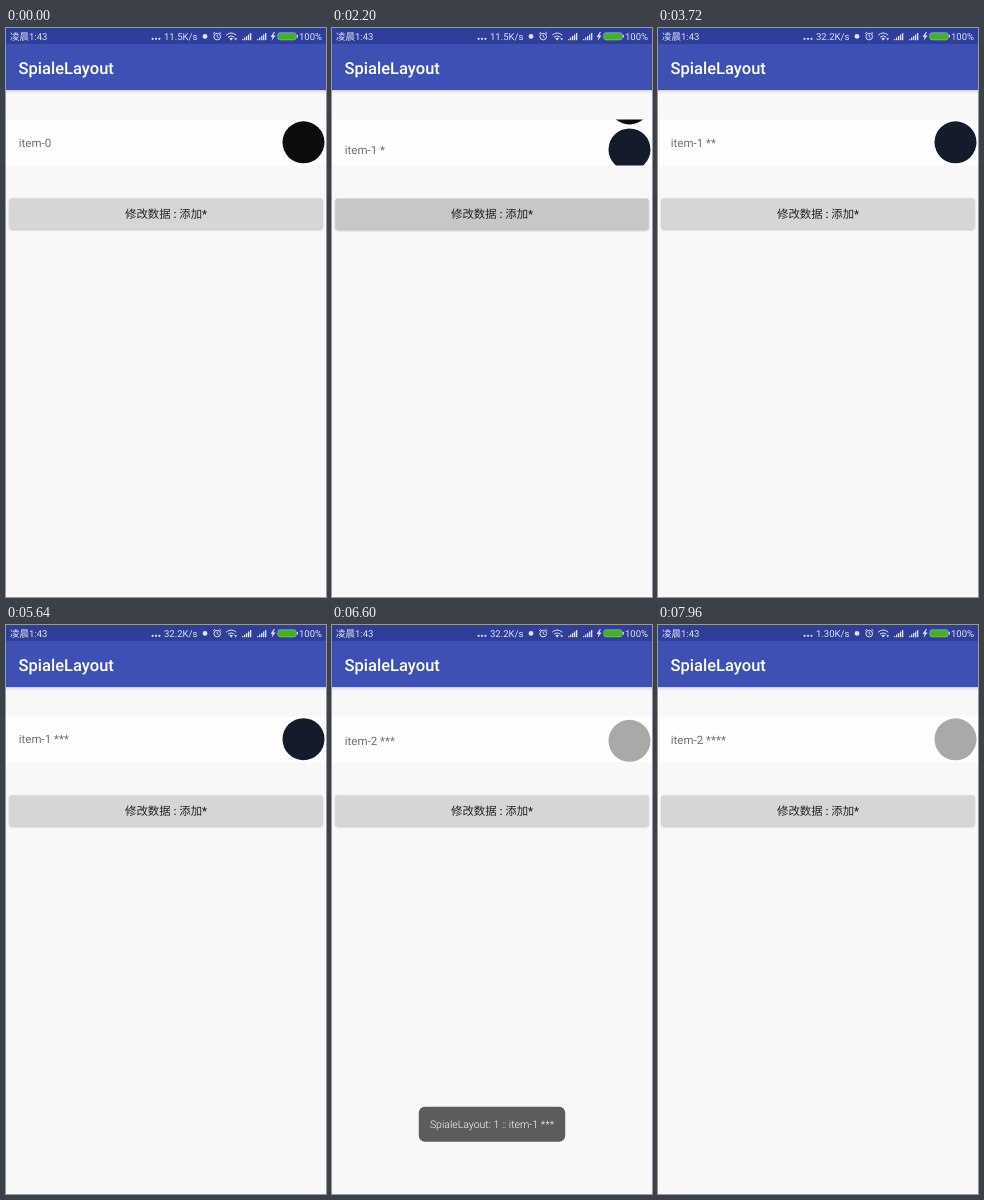
Write an HTML page that moves like this. It is 320 px wide and 569 px high and loops after 8 s.

```html
<!DOCTYPE html>
<html lang="zh-CN">
<head>
<meta charset="utf-8">
<title>SpialeLayout</title>
<style>
  html, body { margin: 0; width: 100%; height: 100%; overflow: hidden; background: #f8f8f8; }
  svg { display: block; width: 100%; height: 100%; }
  text { font-family: Roboto, "Noto Sans CJK SC", "Noto Sans CJK", sans-serif; white-space: pre; text-rendering: geometricPrecision; }
  .status { font-size: 9.5px; fill: #dfe2f1; }
  .title { font-size: 16.5px; font-weight: 500; fill: #fff; }
  .item { font-size: 11.5px; fill: #6f6f6f; }
  .label { font-size: 11.4px; font-weight: 500; fill: #222; }
  .toast { font-size: 10.5px; font-weight: 300; fill: #fff; }
</style>
</head>
<body>
<svg viewBox="0 0 320 569">
  <defs>
    <linearGradient id="barShadow" x2="0" y2="1">
      <stop offset="0" stop-opacity=".18"/>
      <stop offset=".35" stop-opacity=".07"/>
      <stop offset="1" stop-opacity="0"/>
    </linearGradient>
    <filter id="blur" x="-5%" y="-30%" width="110%" height="160%"><feGaussianBlur stdDeviation=".8"/></filter>
    <clipPath id="bannerClip"><rect y="91.5" width="320" height="46"/></clipPath>
    <clipPath id="buttonClip"><rect x="3.3" y="170.5" width="313.4" height="30.6" rx="1.7"/></clipPath>
  </defs>

  <rect id="page" width="320" height="569"/>

  <rect width="320" height="16" fill="#2f3e9a"/>
  <rect y="16" width="320" height="46" fill="#3e50b4"/>
  <rect y="62" width="320" height="4" fill="url(#barShadow)"/>
  <text class="title" x="12.6" y="45.8">SpialeLayout</text>

  <g id="icons" fill="#dfe2f1">
    <text class="status" x="4" y="12.3">凌晨1:43</text>
    <circle cx="146.6" cy="10.8" r="1.1"/><circle cx="150" cy="10.8" r="1.1"/><circle cx="153.4" cy="10.8" r="1.1"/>
    <text class="status" id="speed" x="191.3" y="12.1" text-anchor="end"></text>
    <circle cx="199" cy="8.4" r="2.4"/>
    <g fill="none" stroke="#dfe2f1" stroke-width="1">
      <circle cx="211.2" cy="8.6" r="3.3"/>
      <path d="M211.2 6.7v2.1l1.4.9M207.2 5.7l1.7-1.5M215.2 5.7l-1.7-1.5"/>
      <path d="M220.2 7.2q5-4.4 10 0M222 9.2q3.2-2.7 6.4 0"/>
    </g>
    <path d="M223.4 10.4q1.8-1.4 3.6 0l-1.8 2.1zM228.2 10.2h3l-1.5 2.2z"/>
    <path d="M267.9 3.9l-3.3 5h2l-1 3.8 4-5.3h-2.3l1.6-3.5z"/>
    <rect x="271.7" y="4.7" width="18.6" height="7.2" rx="2.4" fill="#40b321" stroke="#a9b2d2" stroke-width=".6"/>
    <rect x="290.8" y="6.8" width="1" height="3" rx=".5"/>
    <text class="status" x="293" y="12.1">100%</text>
  </g>

  <g clip-path="url(#bannerClip)">
    <rect y="91.5" width="320" height="46" fill="#fefefe"/>
    <g id="track"></g>
  </g>

  <rect id="shadow" x="3.6" width="312.8" height="30.6" rx="2" filter="url(#blur)"/>
  <g clip-path="url(#buttonClip)">
    <rect x="3" y="170" width="314" height="32" fill="#d6d6d6"/>
    <rect id="press" x="3" y="170" width="314" height="32"/>
    <circle id="ripple" cx="160" cy="186"/>
  </g>
  <text class="label" x="160.1" y="190.3" text-anchor="middle">修改数据 : 添加*</text>

  <g id="toast">
    <rect x="86.8" y="481.8" width="146.4" height="35" rx="6" fill="#5c5c5c"/>
    <text class="toast" x="160" y="503" text-anchor="middle">SpialeLayout: 1 :: item-1 ***</text>
  </g>
</svg>

<script>
const LOOP = 8000;
const ROW = 46;
const SCROLLS = [1600, 5620];
const SCROLL_TIME = 2000;
const PRESSES = [1840, 2760, 4000, 7460];
const SPEEDS = [[0, '11.5K/s'], [3040, '32.2K/s'], [7040, '1.30K/s']];
const EMBLEMS = ['#0c0c0c', '#141b2a', '#a9a9a9'];

const $ = id => document.getElementById(id);
const clamp = x => Math.min(1, Math.max(0, x));
const ramp = (t, from, to) => clamp((t - from) / (to - from));
const easeOut = x => 1 - (1 - x) ** 2;

function make(parent, tag, attrs) {
  const node = document.createElementNS('http://www.w3.org/2000/svg', tag);
  for (const key in attrs) node.setAttribute(key, attrs[key]);
  return parent.appendChild(node);
}

function set(id, attrs) {
  for (const key in attrs) $(id).setAttribute(key, attrs[key]);
}

// Fast start with a long exponential tail
function viscous(x) {
  const curve = u => u < 1 ? u - 1 + Math.exp(-u) : 1 - (1 - Math.exp(-1)) * Math.exp(1 - u);
  return curve(8 * clamp(x)) / curve(8);
}

for (const left of [236, 251])
  for (let i = 0; i < 5; i++) {
    const height = 1.2 + i * 1.5;
    make($('icons'), 'rect', { x: left + i * 2, y: 12.2 - height, width: 1.3, height });
  }

const labels = EMBLEMS.map((fill, i) => {
  make($('track'), 'circle', { cx: 297.5, cy: 114.3 + i * ROW, r: 21, fill });
  return make($('track'), 'text', { class: 'item', x: 12.8, y: 118.6 + i * ROW });
});

function render(t) {
  const warm = 1 - ramp(t, 40, 480);
  set('page', { fill: `rgb(${248 + warm}, ${248 - warm}, 248)` });

  const row = SCROLLS.reduce((sum, start) => sum + viscous((t - start) / SCROLL_TIME), 0);
  set('track', { transform: `translate(0 ${-ROW * row})` });

  const stars = '*'.repeat(PRESSES.filter(start => t >= start + 120).length);
  labels.forEach((label, i) => label.textContent = `item-${i} ${stars}`.trim());
  $('speed').textContent = SPEEDS.filter(([start]) => t >= start).pop()[1];

  const start = PRESSES.filter(p => t >= p).pop() ?? -LOOP;
  const age = t - start;
  const level = ramp(age, 0, 80) * (1 - ramp(age, 200, 450));
  set('press', { 'fill-opacity': .1 * level });
  set('ripple', { r: 165 * easeOut(ramp(age, 0, 360)), 'fill-opacity': .1 * level });
  set('shadow', { y: 171.2 + 2 * level, 'fill-opacity': .28 });

  const shown = easeOut(ramp(t, 5720, 5960));
  set('toast', {
    opacity: shown * (1 - ramp(t, 7500, 7820)),
    transform: `translate(0 ${24 * (1 - shown)})`
  });
}

function tick() {
  render(performance.now() % LOOP);
  requestAnimationFrame(tick);
}
tick();
</script>
</body>
</html>
```
